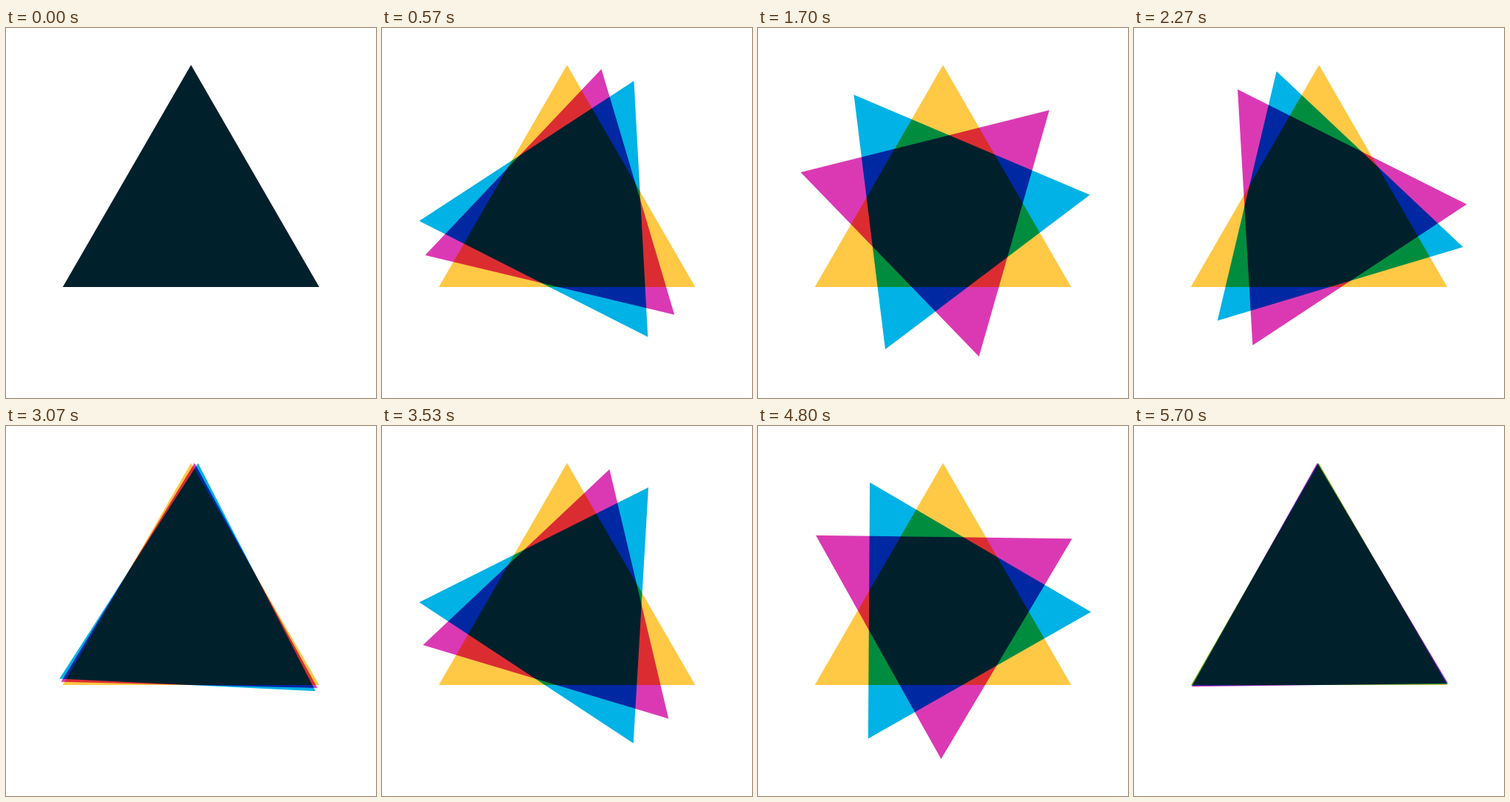
An HTML page with a canvas that plays this animation: 500 by 500 pixels, repeating every 5.73 s.

```html
<!DOCTYPE html>
<html lang="en">
<head>
<meta charset="utf-8">
<title>Rotating triangles</title>
<style>
  html, body { margin: 0; width: 100%; height: 100%; overflow: hidden; background: #fff; }
  canvas { display: block; }
</style>
</head>
<body>
<canvas id="stage" width="500" height="500"></canvas>
<script>
const ctx = document.getElementById('stage').getContext('2d');

const LOOP = 5730;        // ms
const POSES = 72;         // poses per loop, 80 ms apart
const PHASE = 18;         // poses per eased move
const CENTER = 250, RADIUS = 200;

// Angles in degrees at the end of each move; the pair of moves runs twice per loop.
const LAYERS = [
  { color: '#ffc845', keys: [0, 0, 0] },
  { color: '#db39b4', keys: [0, 40, 120] },
  { color: '#00b2e5', keys: [0, 80, 120] }
];

// Poses appear on a 30 fps grid, rounded to 10 ms.
const poseStart = n => Math.round(Math.ceil(n * 80 * 30 / 1000 - 1e-6) * 10 / 3) * 10;

function poseAt(ms) {
  let n = Math.min(POSES - 1, Math.floor(ms / 80) + 1);
  while (n > 0 && poseStart(n) > ms) n--;
  return n;
}

const ease = x => x * x * (3 - 2 * x);

function angleAt(keys, pose) {
  const move = Math.floor(pose / PHASE) % 2;
  const x = ease(pose % PHASE / PHASE);
  return keys[move] + (keys[move + 1] - keys[move]) * x;
}

function triangle(color, degrees) {
  ctx.beginPath();
  for (let i = 0; i < 3; i++) {
    const a = (degrees + i * 120) * Math.PI / 180;
    ctx.lineTo(CENTER + RADIUS * Math.sin(a), CENTER - RADIUS * Math.cos(a));
  }
  ctx.closePath();
  ctx.fillStyle = color;
  ctx.fill();
}

function draw(pose) {
  ctx.globalCompositeOperation = 'source-over';
  ctx.fillStyle = '#fff';
  ctx.fillRect(0, 0, 500, 500);
  ctx.globalCompositeOperation = 'multiply';
  for (const { color, keys } of LAYERS) triangle(color, angleAt(keys, pose));
}

const start = performance.now();

function tick() {
  draw(poseAt((performance.now() - start) % LOOP));
  requestAnimationFrame(tick);
}
tick();
</script>
</body>
</html>
```
